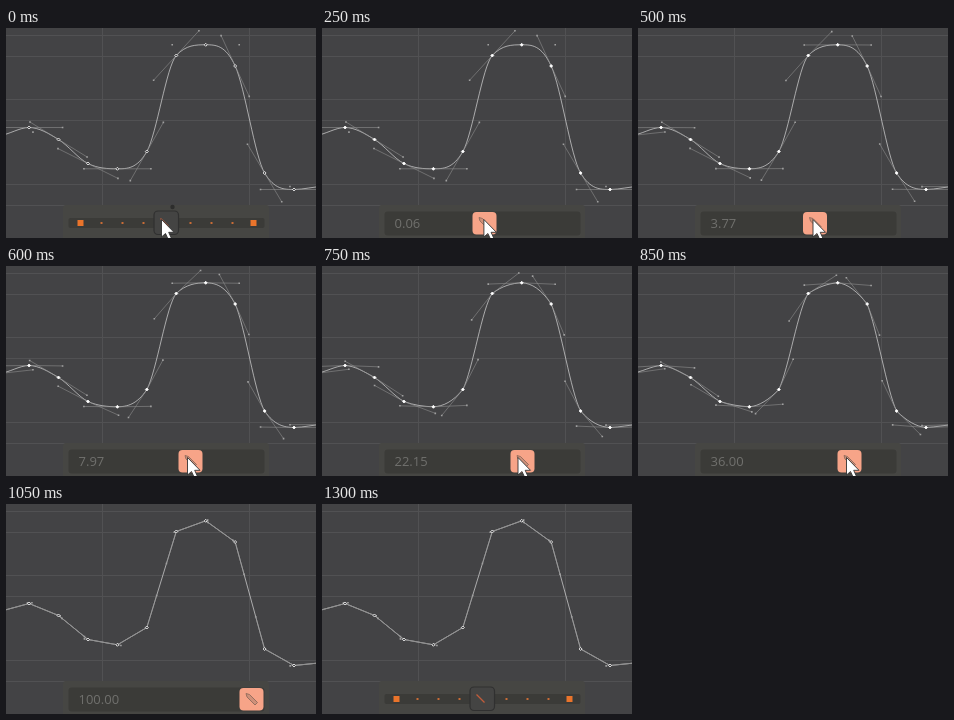
Recreate the animation shown at these times as an HTML page. Size 310 px wide and 210 px high, loop 1.5 s.

```html
<!DOCTYPE html>
<html lang="en">
<head>
<meta charset="utf-8">
<title>Tangent slider</title>
<style>
  html, body { margin: 0; width: 100%; height: 100%; overflow: hidden; background: #434345; }
  svg { display: block; }
  text { font: 13px "Open Sans", "Noto Sans", sans-serif; fill: #70706d; }
</style>
</head>
<body>
<svg width="310" height="210" viewBox="0 0 310 210">
  <path d="M96.5 0V210M243.5 0V210M0 7.5H310M0 28.5H310M0 71.5H310M0 92.5H310M0 156.5H310M0 177.5H310" stroke="#515153"/>
  <g transform="translate(.2 .5)" fill="none">
    <path id="curve" stroke="#f2f2f2" stroke-width=".6"/>
    <path id="handles" stroke="#8e8e8e" stroke-width=".6"/>
    <path id="tips" fill="#a0a0a0"/>
    <path id="keys" stroke="#fff" stroke-width=".8"/>
  </g>
  <rect x="57" y="177" width="206" height="35" rx="3" fill="#464643"/>
  <g id="idle">
    <rect x="62.500" y="190" width="196" height="10" rx="2" fill="#3b3b38"/>
    <path id="dots" fill="#c86c36"/>
    <path d="M71.500 192h6v6h-6zM244.500 192h6v6h-6z" fill="#ea742b"/>
    <rect x="148" y="183" width="24.500" height="23.500" rx="4" fill="#444443" stroke="#303030" stroke-width="1.200"/>
    <path d="M154.500 190.500l8 8" stroke="#c25c3a" stroke-width="1.300"/>
    <circle id="pin" cx="166.500" cy="179" r="2.200" fill="#2d2d2c"/>
  </g>
  <g id="drag">
    <rect x="62.500" y="183.500" width="196" height="24" rx="3" fill="#3b3b38"/>
    <text id="value" x="72.500" y="200"></text>
    <g id="knob">
      <rect x="-12" y="184" width="24" height="22.500" rx="4" fill="#f7a488"/>
      <path d="M-5.500 189.500l3.500 1 8 8-2.500 2.500-8-8z" fill="#cf9079" stroke="#866658" stroke-width=".8"/>
    </g>
  </g>
  <path id="cursor" d="M0 0V17.500L4 14L7 20.500L10 19L7.200 12.800H12.500Z" fill="#fff" stroke="#333" stroke-width=".9"/>
</svg>
<script>
const $ = id => document.getElementById(id);
const LOOP = 1500, STEP = 50, SPAN = 85, REACH = 33.5;
const ASPECT = 6; // value axis against time axis when tangents are normalised

const keyY = [108, 107, 99, 111, 135, 140.3, 123, 27, 16.3, 37.5, 144.5, 161, 158, 158];
const keys = keyY.map((y, i) => ({ x: -36 + i * 29.44, y }));
const last = keys.length - 1;
const faint = [1, 8, 12];

const offset = [[150, 0], [250, 2], [350, 6], [400, 9], [600, 24], [750, 40], [850, 51], [1050, 85]];
const pointer = [[0, 155.5], [150, 157.5], [400, 168.5], [600, 181.5], [750, 196], [850, 208.5], [1000, 238]];

function sample(table, t) {
  if (t <= table[0][0]) return table[0][1];
  for (let i = 1; i < table.length; i++) {
    const [a, u] = table[i - 1], [b, v] = table[i];
    if (t <= b) return u + (v - u) * (t - a) / (b - a);
  }
  return table[table.length - 1][1];
}

const slope = (a, b) => (b.y - a.y) / (b.x - a.x);

// Smooth slope, flat at peaks and limited to three times the gentler side
function autoSlope(i) {
  if (i === 0 || i === last) return 0;
  const a = slope(keys[i - 1], keys[i]), b = slope(keys[i], keys[i + 1]);
  if (a * b <= 0) return 0;
  const mid = slope(keys[i - 1], keys[i + 1]);
  return Math.sign(mid) * Math.min(Math.abs(mid), 3 * Math.abs(a), 3 * Math.abs(b));
}

function unit(m) {
  const n = Math.hypot(1, m * ASPECT);
  return [1 / n, m / n];
}

function tangent(i, side, mix) {
  const other = keys[i + side];
  const a = unit(autoSlope(i)), b = unit(slope(keys[i], other));
  return (a[1] + (b[1] - a[1]) * mix) / (a[0] + (b[0] - a[0]) * mix);
}

const f = n => n.toFixed(2);
const pt = (x, y) => f(x) + " " + f(y);

function drawGraph(mix, active) {
  let curve = "M" + pt(keys[1].x, keys[1].y), lines = "", tips = "", marks = "";
  for (let i = 1; i < last; i++) {
    const k = keys[i], n = keys[i + 1];
    if (i < last - 1) {
      const w = (n.x - k.x) / 3;
      curve += "C" + pt(k.x + w, k.y + w * tangent(i, 1, mix)) + " " +
        pt(n.x - w, n.y - w * tangent(i + 1, -1, mix)) + " " + pt(n.x, n.y);
    }
    for (const side of [-1, 1]) {
      const m = tangent(i, side, mix), r = side * REACH / Math.hypot(1, m);
      const x = k.x + r, y = k.y + r * m;
      if (mix > 0.02 || !faint.includes(i)) lines += "M" + pt(k.x, k.y) + "L" + pt(x, y);
      tips += "M" + pt(x - 0.8, y - 0.8) + "h1.6v1.6h-1.6z";
    }
    marks += "M" + pt(k.x, k.y - 1.5) + "l1.5 1.5l-1.5 1.5l-1.5 -1.5z";
  }
  $("curve").setAttribute("d", curve);
  $("handles").setAttribute("d", lines);
  $("tips").setAttribute("d", tips);
  $("keys").setAttribute("d", marks);
  $("keys").setAttribute("fill", active ? "#fff" : "#434345");
}

const show = (id, on) => $(id).setAttribute("visibility", on ? "visible" : "hidden");

function render(ms) {
  const t = Math.floor((ms % LOOP) / STEP) * STEP;
  const dragging = t >= 150 && t < 1300;
  const d = sample(offset, t), mix = (d / SPAN) ** 2;
  drawGraph(mix, dragging && t < 1050);
  show("idle", !dragging);
  show("pin", t < 150);
  show("drag", dragging);
  show("cursor", t < 1050);
  $("value").textContent = (mix * 100).toFixed(2);
  $("knob").setAttribute("transform", `translate(${f(160.5 + d)} 0)`);
  $("cursor").setAttribute("transform", `translate(${f(sample(pointer, t))} 191.5)`);
}

$("dots").setAttribute("d", [95.5, 116.5, 137.5, 184.5, 205.5, 226.5]
  .map(x => `M${x - 1} 194h2v2h-2z`).join(""));

const start = performance.now();
function tick() {
  render(performance.now() - start);
  requestAnimationFrame(tick);
}
tick();
</script>
</body>
</html>
```
